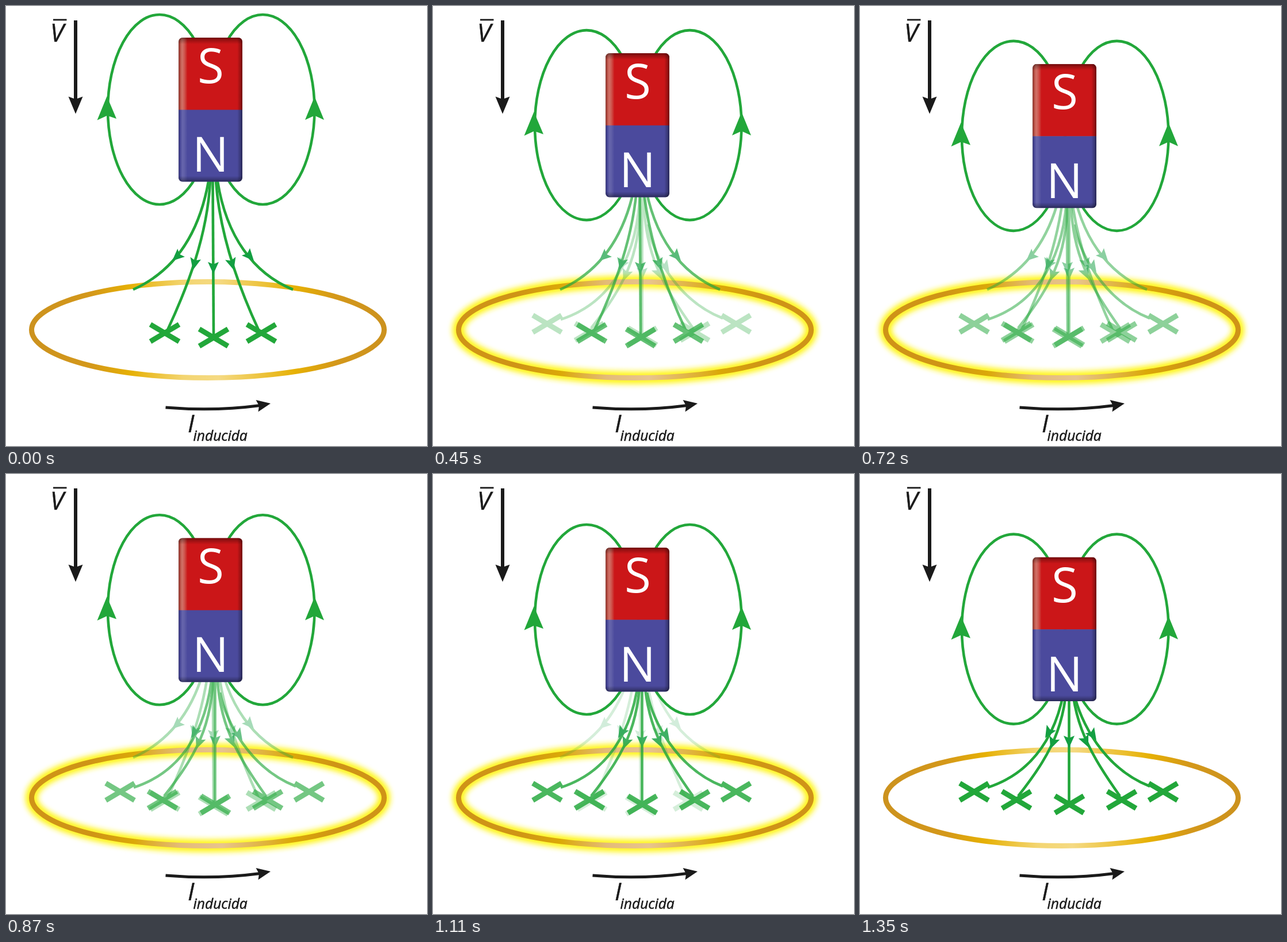
An HTML page for the animation above (1.8 s loop, 732 by 765 pixels).

```html
<!DOCTYPE html>
<html lang="es">
<head>
<meta charset="utf-8">
<title>Corriente inducida</title>
<style>
  html, body { margin: 0; width: 100%; height: 100%; overflow: hidden; background: #fff; }
  svg { display: block; width: 100vw; height: 100vh; font-family: "Open Sans", "Noto Sans", sans-serif; }
  .field { fill: none; stroke: #22a73a; stroke-width: 4.6; }
  .cross { fill: none; stroke: #22a73a; stroke-width: 9; }
  .head { fill: #139f42; }
  .ring { fill: none; stroke-width: 9; }
  .ink { fill: #1a1a1a; }
  .line { fill: none; stroke: #1a1a1a; }
  .pole { fill: #fff; font-size: 83.5px; text-anchor: middle; }
  .it { fill: #1a1a1a; stroke: #1a1a1a; stroke-width: .5; font-style: italic; }
</style>
</head>
<body>
<svg viewBox="0 0 732 765">
  <defs>
    <linearGradient id="gold">
      <stop offset="0" stop-color="#cc921e"/>
      <stop offset=".17" stop-color="#d4981a"/>
      <stop offset=".28" stop-color="#e6b004"/>
      <stop offset=".43" stop-color="#f3d571"/>
      <stop offset=".53" stop-color="#f5da83"/>
      <stop offset=".75" stop-color="#e6b004"/>
      <stop offset=".86" stop-color="#d4981a"/>
      <stop offset="1" stop-color="#cc921e"/>
    </linearGradient>
    <linearGradient id="lit">
      <stop offset="0" stop-color="#cf9318"/>
      <stop offset=".17" stop-color="#cf9416"/>
      <stop offset=".29" stop-color="#dba808"/>
      <stop offset=".42" stop-color="#e4bb78"/>
      <stop offset=".54" stop-color="#e8c48e"/>
      <stop offset=".74" stop-color="#dba808"/>
      <stop offset=".86" stop-color="#cf9416"/>
      <stop offset="1" stop-color="#cf9318"/>
    </linearGradient>
    <linearGradient id="red">
      <stop offset="0" stop-color="#b2463c"/>
      <stop offset=".05" stop-color="#c85c50"/>
      <stop offset=".1" stop-color="#c93a32"/>
      <stop offset=".14" stop-color="#cb1618"/>
    </linearGradient>
    <linearGradient id="sides">
      <stop offset="0" stop-color="#000" stop-opacity=".25"/>
      <stop offset=".03" stop-color="#000" stop-opacity="0"/>
      <stop offset=".05" stop-color="#fff" stop-opacity=".14"/>
      <stop offset=".08" stop-color="#fff" stop-opacity=".14"/>
      <stop offset=".14" stop-color="#fff" stop-opacity="0"/>
      <stop offset=".92" stop-color="#000" stop-opacity="0"/>
      <stop offset=".96" stop-color="#000" stop-opacity=".2"/>
      <stop offset="1" stop-color="#000" stop-opacity=".45"/>
    </linearGradient>
    <linearGradient id="ends" x2="0" y2="1">
      <stop offset="0" stop-color="#000" stop-opacity=".45"/>
      <stop offset=".02" stop-color="#000" stop-opacity=".22"/>
      <stop offset=".045" stop-color="#000" stop-opacity="0"/>
      <stop offset=".96" stop-color="#000" stop-opacity="0"/>
      <stop offset=".98" stop-color="#000" stop-opacity=".2"/>
      <stop offset="1" stop-color="#000" stop-opacity=".45"/>
    </linearGradient>
    <filter id="blur" filterUnits="userSpaceOnUse" x="0" y="440" width="732" height="250">
      <feGaussianBlur stdDeviation="4.6"/>
    </filter>
    <clipPath id="body"><rect x="300" y="55" width="111" height="250.5" rx="7"/></clipPath>
  </defs>

  <rect width="732" height="765" fill="#fff"/>
  <ellipse id="glow" cx="351" cy="563" rx="306.5" ry="83.5" fill="none" stroke="#fff51c" stroke-width="22" filter="url(#blur)"/>
  <ellipse id="ring" class="ring" cx="351" cy="563" rx="306.5" ry="83.5"/>

  <g id="near"></g>
  <g id="far"></g>

  <g id="magnet">
    <ellipse class="field" cx="267" cy="180" rx="90" ry="165"/>
    <ellipse class="field" cx="446.5" cy="180" rx="90" ry="165"/>
    <path fill="#22a73a" d="M175.500 157L192 196L176 190.500L158.500 198.500Z M536.500 157.500L553 198L536.500 190.500L520 198Z"/>
    <g clip-path="url(#body)">
      <rect x="300" y="55" width="111" height="126" fill="url(#red)"/>
      <rect x="300" y="180.500" width="111" height="126" fill="#4b4a9d"/>
      <rect x="300" y="55" width="111" height="250.500" fill="url(#sides)"/>
      <rect x="300" y="55" width="111" height="250.500" fill="url(#ends)"/>
    </g>
    <text class="pole" x="356" y="133.500">S</text>
    <text class="pole" x="355.500" y="288">N</text>
  </g>

  <path class="line" stroke-width="6" d="M121 25V164"/>
  <path class="ink" d="M121 187.500L108.500 157.500L121 162L133.500 157.500Z"/>
  <path class="line" stroke-width="2.800" d="M82 24H105.500"/>
  <text class="it" x="77" y="62" font-size="43">V</text>

  <path class="line" stroke-width="5" d="M277.500 698Q362 705 442 694.500"/>
  <path class="ink" d="M460 691L434.500 685L440 695L438.500 705.500Z"/>
  <text class="it" x="316" y="741" font-size="42">I</text>
  <text class="it" x="325.500" y="756" font-size="24.600">inducida</text>
</svg>
<script>
const $ = id => document.getElementById(id);
const LOOP = 1800, STEP = 30, STEPS = 43, DROP = 89.6;

const line = d => `<path class="field" d="${d}"/>`;
const head = ([x, y, a]) =>
  `<path class="head" transform="translate(${x} ${y}) rotate(${a})" d="M0 0L-21 9.5L-17 0L-21 -9.5Z"/>`;
const cross = ([x, y], w = 25, h = 14.8) =>
  `<path class="cross" d="M${x - w} ${y - h}L${x + w} ${y + h}M${x - w} ${y + h}L${x + w} ${y - h}"/>`;

function fan(id, lines, heads, marks) {
  $(id).innerHTML = lines.map(line).join('') + heads.map(head).join('') +
    marks.map(m => cross(m)).join('');
}

fan('near',
  ['M352 305C335 400 290 462 221 493', 'M355 305C350 400 315 490 281 563',
   'M359.5 305L361 575', 'M365 305C372 400 405 490 440 565', 'M368 305C383 400 430 465 499 493'],
  [[289, 443, 138], [325, 459, 103], [360.5, 466, 90], [396, 459, 74], [431, 443, 48]],
  [[276, 568.5], [361, 576.5], [444, 568.5]]);

fan('far',
  ['M360 320C357 432 312 516 222 545', 'M361 320C361 425 342 475 275 560',
   'M363.5 320V572', 'M366 320C367 420 388 470 452 560', 'M372 380C382 430 424 512 504 543'],
  [[322, 459, 121], [331, 478, 111], [363.5, 476, 90], [397, 475, 66], [411, 463, 56]],
  [[198.5, 552.5], [272, 566.5], [364, 574.5], [455, 566.5], [527, 552.5]]);

function draw(t) {
  const n = Math.min(STEPS, Math.max(0, Math.floor(t / STEP) - 2));
  const p = n / STEPS;
  const on = n > 0 && n < STEPS;
  $('magnet').setAttribute('transform', `translate(0 ${(DROP * p).toFixed(2)})`);
  $('near').setAttribute('opacity', 1 - p);
  $('far').setAttribute('opacity', p);
  $('glow').setAttribute('visibility', on ? 'visible' : 'hidden');
  $('ring').setAttribute('stroke', on ? 'url(#lit)' : 'url(#gold)');
}

const start = performance.now();
function tick() {
  draw((performance.now() - start) % LOOP);
  requestAnimationFrame(tick);
}
draw(0);
requestAnimationFrame(tick);
</script>
</body>
</html>
```
